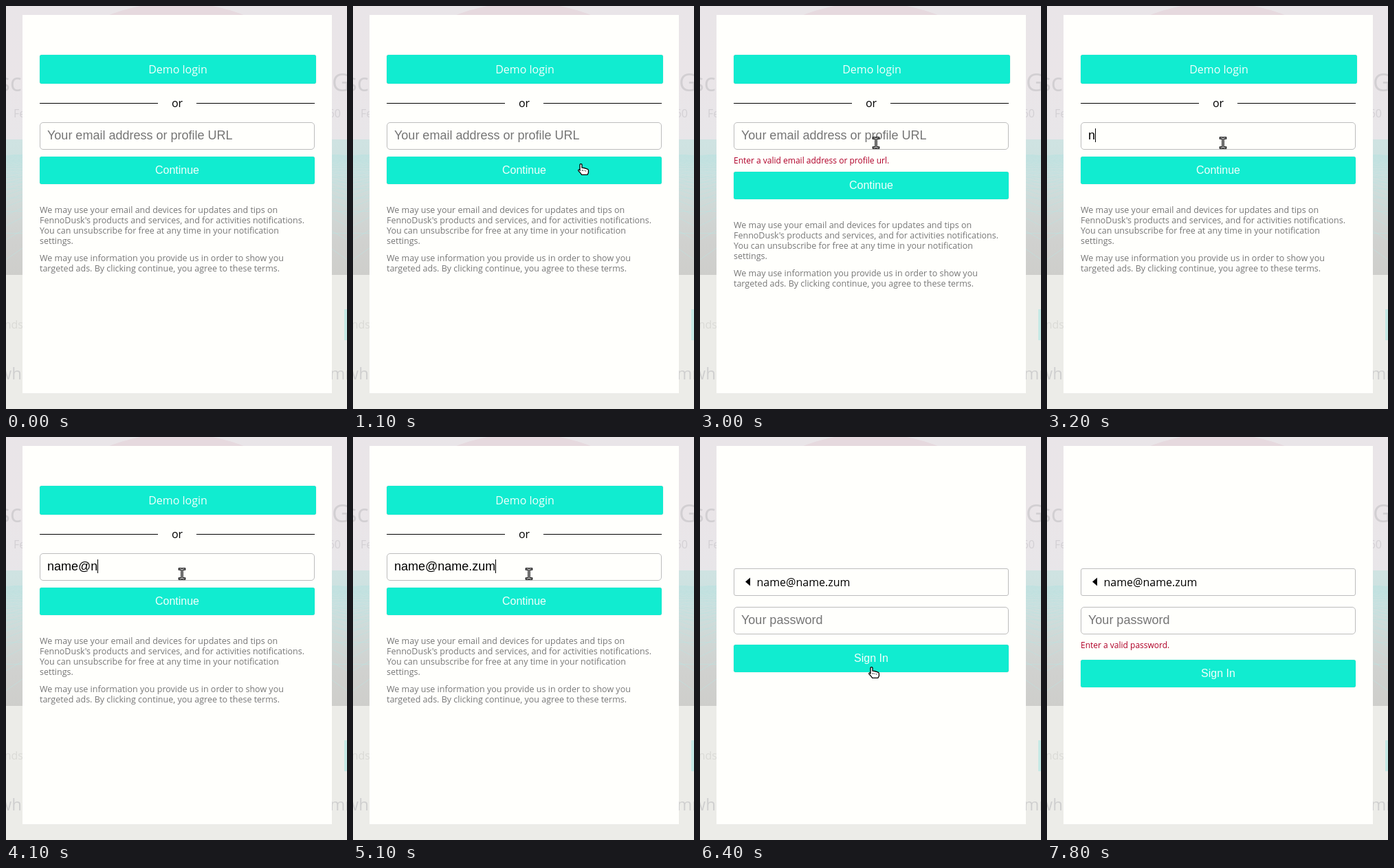
An HTML page with a canvas for the animation above (7900 ms loop, 496 by 586 pixels).

```html
<!DOCTYPE html>
<html lang="en">
<head>
<meta charset="utf-8">
<title>Login form</title>
<style>
html, body { margin: 0; width: 100%; height: 100%; overflow: hidden; background: #ecece8; }
canvas { position: absolute; left: 0; top: 0; }
#panel { position: absolute; left: 24px; top: 13px; width: 450px; height: 550px; background: #fffffc; }
#login, #signin { position: absolute; left: -24px; top: -13px; width: 496px; height: 586px;
  font: 16px/22px "Open Sans", sans-serif; color: #000; }
#login > *, #signin > * { position: absolute; left: 49px; white-space: nowrap; box-sizing: border-box; }
.button { width: 400px; height: 40px; border-radius: 3px; background: #11ecd0; color: #f2fffc;
  box-shadow: 0 0 1px rgba(0, 0, 0, .3); text-align: center; font: 16px/40px "Liberation Sans", Arial, sans-serif; }
.demo { top: 71px; width: 402px; height: 42px; font: 16px/42px "Open Sans", sans-serif; }
.rule { top: 141px; width: 172px; height: 1px; background: #000; }
.or { top: 130px; width: 400px; text-align: center; }
.field { width: 400px; height: 40px; border: 1px solid #bdbdbd; border-radius: 5px; background: #fffffc;
  padding-left: 10px; font: 18px/36px "Liberation Sans", Arial, sans-serif; }
.hint { color: #757575; }
#caret { position: absolute; top: 8px; width: 1px; height: 20px; background: #000; }
.error { color: #b00028; font-size: 12px; line-height: 15px; }
#terms { color: #777; font-size: 12.5px; line-height: 15px; }
#terms p { margin: 0 0 10px; }
.account { top: 191px; border-radius: 3px; padding-left: 32.5px; font: 16px/40px "Open Sans", sans-serif; line-height: 40px; }
.account span { position: relative; top: -1px; }
.account svg { position: absolute; left: 15px; top: 11px; }
</style>
</head>
<body>
<canvas id="scene" width="496" height="586"></canvas>
<div id="panel">
  <div id="login">
    <div class="button demo">Demo login</div>
    <div class="rule"></div>
    <div class="rule" style="left:277px"></div>
    <div class="or">or</div>
    <div class="field" style="top:169px"><span id="typed"></span><i id="caret"></i><span id="hint" class="hint">Your email address or profile URL</span></div>
    <div id="emailError" class="error" style="top:217px">Enter a valid email address or profile url.</div>
    <div id="next" class="button">Continue</div>
    <div id="terms">
      <p>We may use your email and devices for updates and tips on<br>FennoDusk's products and services, and for activities notifications.<br>You can unsubscribe for free at any time in your notification<br>settings.</p>
      <p>We may use information you provide us in order to show you<br>targeted ads. By clicking continue, you agree to these terms.</p>
    </div>
  </div>
  <div id="signin">
    <div class="field account"><svg width="10" height="16"><path d="M1 7.5 8 1.5V13.5Z"/></svg><span id="account"></span></div>
    <div class="field hint" style="top:247px">Your password</div>
    <div id="passError" class="error" style="top:295px">Enter a valid password.</div>
    <div id="submit" class="button">Sign In</div>
  </div>
</div>
<canvas id="pointer" width="496" height="586"></canvas>
<script>
const LOOP = 7900, STEP = 100, SHIFT = 22;
const EMAIL = 'name@name.zum';
const KEYS = [3200, 3300, 3400, 3500, 3700, 4100, 4200, 4300, 4500, 4600, 4700, 4800, 4800];
const FOCUS = 2500, SWITCH = 5300;
// time, x, y of the pointer's hotspot
const PATH = [
  [200, 500, 350], [1100, 331, 230], [1400, 331, 230], [1600, 332, 241], [1700, 332, 241],
  [2400, 256, 199], [6000, 256, 199], [6200, 249, 335], [7100, 249, 335], [7500, 500, 140]
];
const $ = id => document.getElementById(id);
const show = (id, on) => { $(id).style.visibility = on ? 'inherit' : 'hidden'; };

function drawScene() {
  const c = $('scene').getContext('2d');
  const fade = (y0, y1, ...colors) => {
    const g = c.createLinearGradient(0, y0, 0, y1);
    colors.forEach((color, i) => g.addColorStop(i / (colors.length - 1), color));
    c.fillStyle = g;
    c.fillRect(0, y0, 496, y1 - y0);
  };
  fade(0, 194, '#e9e5e8', '#eae5e8', '#e8e6e9');
  c.fillStyle = '#e6d9de';
  c.beginPath();
  c.arc(248, 270, 275, 0, 7);
  c.save();
  c.clip();
  c.fillRect(0, 0, 496, 13);
  c.restore();
  fade(194, 391, '#cfe3e2', '#cde0df', '#d0d8d6', '#d0d1cf', '#cececb');

  c.save();
  c.beginPath();
  c.rect(0, 216, 496, 175);
  c.clip();
  c.strokeStyle = 'rgba(188,226,224,.6)';
  c.beginPath();
  for (let i = -40; i <= 40; i++) {
    c.moveTo(248, 196);
    c.lineTo(248 + i * 56, 391);
  }
  for (let k = 1; k < 14; k++) {
    const y = 196 + 195 / (1 + k * .45);
    c.moveTo(0, y);
    c.lineTo(496, y);
  }
  c.stroke();
  c.restore();

  const label = (text, x, y, size, color, align = 'left') => {
    c.font = size + 'px "Open Sans", sans-serif';
    c.fillStyle = color;
    c.textAlign = align;
    c.fillText(text, x, y);
  };
  label('sc', 23, 124, 36, '#d2cfd2', 'right');
  label('G', 474, 124, 36, '#d2cfd2');
  label('Fe', 11, 162, 16, '#d3d0d4');
  label('60', 487, 162, 16, '#d3d0d4', 'right');
  label('ands', 25, 469, 16, '#dadad6', 'right');
  label('wh', 23, 543, 24, '#cfcfcf', 'right');
  label('mm', 471, 543, 24, '#cfcfcf');
  c.fillStyle = '#c6e9e5';
  c.fillRect(492, 441, 4, 45);
}

function pointerAt(t) {
  if (t <= PATH[0][0] || t >= PATH.at(-1)[0]) return null;
  const i = PATH.findIndex(p => p[0] > t);
  const [t0, x0, y0] = PATH[i - 1], [t1, x1, y1] = PATH[i];
  const u = (t - t0) / (t1 - t0), e = u * u * (3 - 2 * u);
  return [Math.round(x0 + (x1 - x0) * e), Math.round(y0 + (y1 - y0) * e)];
}

function pointerKind(x, y, signin, shift) {
  if (x < 49 || x > 449) return 'arrow';
  const within = (top, height = 40) => y >= top && y < top + height;
  if (within(signin ? 247 : 169)) return 'beam';
  const hand = signin ? within(191) || within(302 + shift) : within(71, 42) || within(219 + shift);
  return hand ? 'hand' : 'arrow';
}

const HAND = new Path2D('M3 9V2.2Q3 .7 4.5 .7T6 2.2V6.2L9 6.5 12 7.3 14.5 8.3Q15.4 8.8 15.4 10V13.5L14 16.3H5.6L4 14 .8 10.6Q.5 8.8 2 8.8L3.8 10.5');
const KNUCKLES = new Path2D('M6.5 9V11M9 9.5V11M11.5 10V11.5');
const BEAM = new Path2D('M-3.5 -7H-1Q0 -7 0 -6Q0 -7 1 -7H3.5M0 -6V6M-3.5 7H-1Q0 7 0 6Q0 7 1 7H3.5');
const ARROW = new Path2D('M.5 .5V15.5L4 12.3 6.3 17.6 8.7 16.5 6.4 11.4H11.3Z');
const pen = $('pointer').getContext('2d');

function drawPointer(kind, x, y) {
  const stroke = (path, color, width) => {
    pen.strokeStyle = color;
    pen.lineWidth = width;
    pen.stroke(path);
  };
  pen.save();
  pen.lineJoin = 'round';
  pen.fillStyle = '#fff';
  if (kind === 'beam') {
    pen.translate(x, y);
    pen.lineCap = 'square';
    stroke(BEAM, '#000', 3.4);
    stroke(BEAM, '#fff', 1);
  } else {
    const hand = kind === 'hand';
    const shape = hand ? HAND : ARROW;
    pen.translate(x - (hand ? 4 : 0), y - (hand ? 1 : 0));
    pen.fill(shape);
    stroke(shape, '#000', 1.3);
    if (hand) stroke(KNUCKLES, '#000', .8);
  }
  pen.restore();
}

function render(t) {
  const signin = t >= SWITCH;
  const badEmail = t >= 1200 && t < KEYS[0];
  const badPass = t >= 6500;
  const count = KEYS.filter(k => k <= t).length;
  const lastKey = count ? KEYS[count - 1] : FOCUS;
  const shift = (signin ? badPass : badEmail) ? SHIFT : 0;

  show('login', !signin);
  show('signin', signin);
  show('emailError', badEmail);
  show('passError', badPass);
  show('hint', !count);
  show('caret', t >= FOCUS && (t - lastKey) % 1000 < 500);
  $('typed').textContent = EMAIL.slice(0, count);
  $('caret').style.left = 10 + $('typed').offsetWidth + 'px';
  $('next').style.top = 219 + shift + 'px';
  $('terms').style.top = 289 + shift + 'px';
  $('submit').style.top = 302 + shift + 'px';

  pen.clearRect(0, 0, 496, 586);
  const spot = pointerAt(t);
  if (spot) drawPointer(pointerKind(...spot, signin, shift), ...spot);
}

let shown = -1;
function tick() {
  const t = Math.floor(performance.now() % LOOP / STEP) * STEP;
  if (t !== shown) render(shown = t);
  requestAnimationFrame(tick);
}

$('account').textContent = EMAIL;
drawScene();
tick();
</script>
</body>
</html>
```
